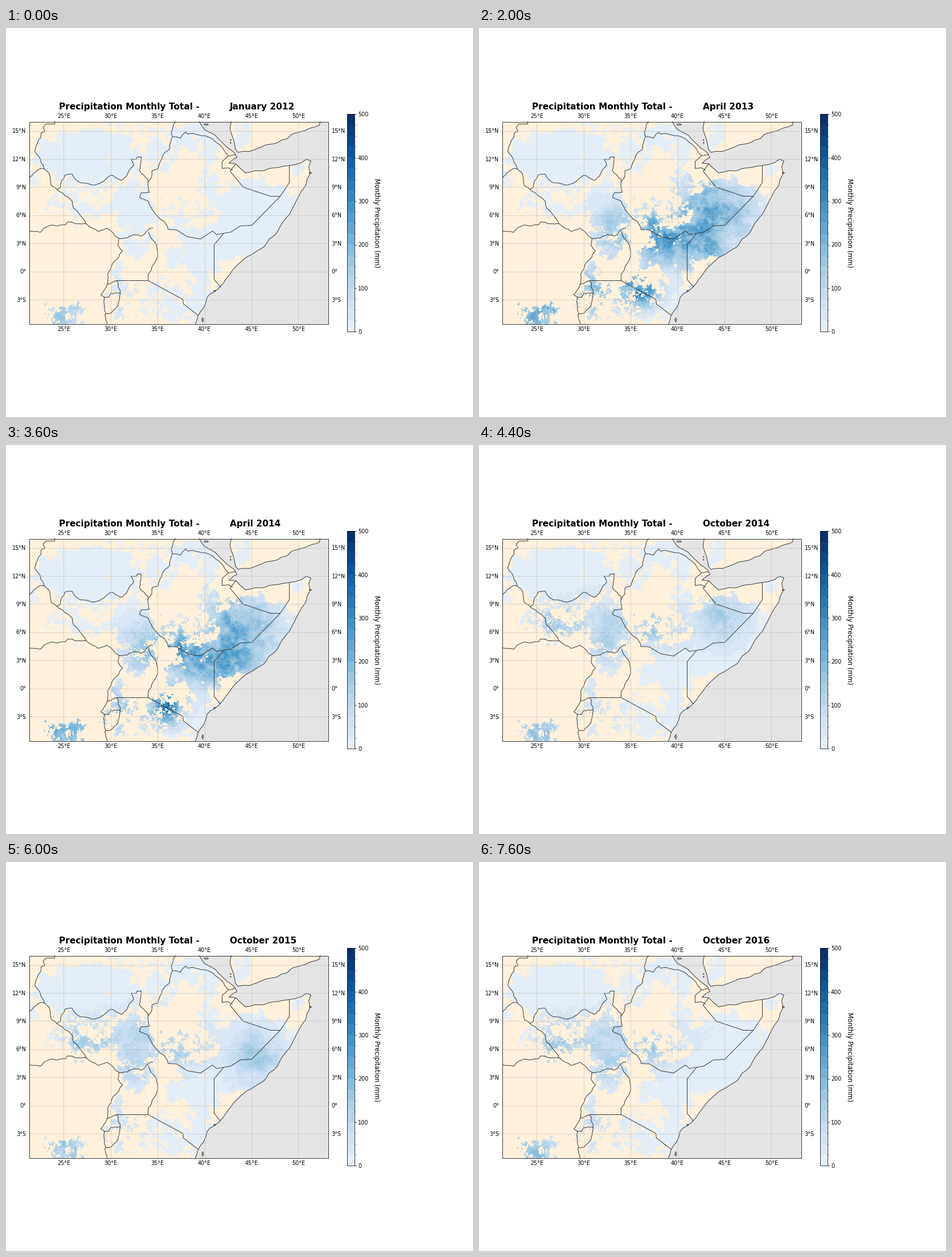
Recreate the animation shown at these times as a matplotlib script. Size 820 by 683 pixels, loop 8 s.

```python
import numpy as np
import matplotlib
import matplotlib.pyplot as plt
from matplotlib.animation import FuncAnimation
from matplotlib.colors import ListedColormap
from matplotlib.patches import Polygon, Rectangle

W, H, DPI = 820, 683, 64
PT = 68.333 / DPI
TEXT_PT = 69.2 / DPI
LEFT, RIGHT, TOP, BOTTOM = 41.3, 566, 164.8, 519.8
DEGREE, LON_25, EQUATOR = 16.48, 101.4, 427.8
COLS, ROWS = 318, 215
LAND, SEA, INK = "#fff1dc", "#e4e4e4", "#333333"
MONTHS = ("January", "April", "July", "October")

fig = plt.figure(figsize=(W / DPI, H / DPI), dpi=DPI, facecolor="white")
ax = fig.add_axes([0, 0, 1, 1])
ax.axis("off")
blues = ListedColormap(matplotlib.colormaps["Blues"](np.linspace(0.1, 1, 20)))
rng = np.random.default_rng(7)


def value_noise(gen, size):
    """Smoothly interpolated random lattice with cells of the given size."""
    grid = gen.random((int(ROWS / size) + 2, int(COLS / size) + 2))
    r, c = np.arange(ROWS) / size, np.arange(COLS) / size
    i, j = r.astype(int), c.astype(int)
    u, v = (r - i)[:, None], (c - j)[None, :]
    u, v = u * u * (3 - 2 * u), v * v * (3 - 2 * v)
    upper = grid[np.ix_(i, j)] * (1 - v) + grid[np.ix_(i, j + 1)] * v
    lower = grid[np.ix_(i + 1, j)] * (1 - v) + grid[np.ix_(i + 1, j + 1)] * v
    return upper * (1 - u) + lower * u


def fractal(gen, size, gain=0.8):
    """Layered noise, ranked so its values are spread evenly over 0..1."""
    total = sum(value_noise(gen, size / 2**k) * gain**k for k in range(4))
    return total.ravel().argsort().argsort().reshape(ROWS, COLS) / total.size


gx, gy = np.meshgrid(np.linspace(LEFT, RIGHT, COLS), np.linspace(TOP, BOTTOM, ROWS))
warp_x, warp_y = (18 * (fractal(rng, 16) - 0.5) for _ in "xy")


def region(x, y, rx, ry, density):
    """Chance of coverage inside a ragged ellipse, fading at its rim."""
    d = np.hypot((gx + warp_x - x) / rx, (gy + warp_y - y) / ry)
    return density * np.clip((1.12 - d) * 4, 0, 1)


WET = [
    (145, 226, 94, 48, 0.98), (55, 250, 25, 25, 0.6), (235, 195, 70, 45, 0.3),
    (225, 315, 40, 52, 0.97), (145, 308, 68, 34, 0.45), (230, 375, 36, 26, 0.7),
    (275, 232, 28, 26, 0.6), (318, 188, 34, 25, 0.95), (355, 240, 16, 60, 0.8),
    (315, 330, 48, 32, 0.35), (430, 340, 92, 72, 1), (335, 420, 46, 84, 0.97),
    (285, 475, 38, 36, 0.6), (201, 443, 10, 28, 0.8), (203, 496, 9, 18, 0.6),
    (101, 508, 15, 28, 0.9), (98, 505, 40, 24, 0.35), (412, 186, 15, 28, 0.9),
    (516, 241, 16, 12, 0.8), (215, 485, 50, 35, 0.12),
]
DRY = [
    (311, 440, 15, 28, 0.85), (286, 376, 22, 15, 0.8), (372, 447, 18, 20, 0.7),
    (404, 412, 20, 9, 0.5), (480, 264, 36, 18, 0.75), (360, 328, 20, 16, 0.5),
]
chance = np.max([region(*r) for r in WET], axis=0)
chance *= np.prod([1 - region(*r) for r in DRY], axis=0)
covered = fractal(rng, 8) < chance

# Rain cells as (x, y, radius, millimetres); autumn has a shifting eastern cell.
RAIN = {
    "January": [(102, 505, 60, 135), (203, 470, 40, 50)],
    "April": [(102, 505, 60, 185), (203, 460, 50, 140), (235, 350, 50, 120),
              (315, 365, 45, 220), (390, 385, 50, 190), (400, 305, 55, 160),
              (285, 460, 32, 280), (465, 330, 50, 80)],
    "July": [(60, 230, 55, 160), (160, 230, 75, 75), (235, 310, 60, 150),
             (140, 310, 55, 130), (295, 205, 45, 240), (238, 380, 28, 140),
             (350, 245, 40, 90)],
    "October": [(102, 505, 60, 140), (203, 460, 50, 65), (230, 310, 60, 85),
                (135, 318, 45, 120), (225, 365, 35, 60), (310, 325, 45, 100)],
}
AUTUMN = {2012: (430, 335, 55, 60), 2013: (445, 325, 50, 110), 2014: (425, 302, 50, 120),
          2015: (440, 340, 55, 125), 2016: (405, 300, 50, 20)}


def rainfall(frame):
    year, month = 2012 + frame // 4, MONTHS[frame % 4]
    gen = np.random.default_rng(100 + frame)
    cells = RAIN[month] + ([AUTUMN[year]] if month == "October" else [])
    total = sum(mm * np.exp(-((gx - x) ** 2 + (gy - y) ** 2) / r**2)
                for x, y, r, mm in cells)
    variation = 0.6 + 0.55 * fractal(gen, 16) + 0.25 * fractal(gen, 8)
    return np.ma.masked_where(~covered, 3 + total * variation)


def points(xy):
    return np.array(xy, float).reshape(-1, 2) + 0.5


def rough(xy, amount=0.06):
    """Break straight runs into small irregular bends."""
    pts = points(xy)
    for _ in range(3):
        step = np.diff(pts, axis=0)
        shift = rng.normal(0, amount, len(step)) * (np.hypot(*step.T) > 3)
        mids = (pts[:-1] + pts[1:]) / 2 + step[:, ::-1] * [-1, 1] * shift[:, None]
        pts = np.insert(pts, np.arange(1, len(pts)), mids, axis=0)
    return pts


def draw(pts):
    ax.plot(*pts.T, color=INK, lw=PT, zorder=3, solid_joinstyle="round")


def border(*xy):
    draw(rough(xy))


def straight(*xy):
    draw(points(xy))


def box(x0, y0, x1, y1, **style):
    ax.add_patch(Rectangle((x0, y0), x1 - x0, y1 - y0, **style))


raster = ax.imshow(rainfall(0), extent=(LEFT, RIGHT, BOTTOM, TOP), cmap=blues, vmin=0,
                   vmax=500, interpolation="nearest", aspect="auto", zorder=1)
box(LEFT, TOP, RIGHT, BOTTOM, fc=LAND, zorder=0)

africa = rough([339, 164, 347, 177, 367, 188, 378, 200, 401, 219, 405, 227, 391, 237,
                403, 238, 420, 254, 440, 250, 452, 250, 462, 246, 497, 241, 518, 236,
                527, 230, 535, 233, 531, 243, 533, 256, 526, 275, 512, 297, 497, 327,
                475, 359, 452, 384, 433, 396, 413, 409, 376, 453, 353, 472, 346, 492,
                337, 504, 332, 519], 0.03)
arabia = rough([395, 164, 393, 177, 400, 200, 402, 212, 407, 218, 428, 216, 455, 205,
                493, 194, 500, 187, 518, 181, 550, 170, 551, 164], 0.03)
corners = [(RIGHT, BOTTOM), (RIGHT, TOP)]
ax.add_patch(Polygon(np.vstack([africa, corners, arabia[::-1]]), fc=SEA, zorder=2))
draw(africa)
draw(arabia)

border(85, 164, 85, 168, 70, 168, 65, 173, 68, 181, 61, 184, 61, 191, 56, 198, 50, 215,
       59, 228, 61, 236, 67, 247, 76, 256, 79, 276, 89, 283, 116, 304, 118, 316,
       134, 333, 140, 343, 160, 356, 177, 351, 198, 369)
border(67, 247, 61, 246, 50, 253, 41, 262)
border(89, 283, 95, 279, 103, 258, 115, 256, 126, 269, 165, 272, 184, 258, 201, 267,
       211, 260, 224, 240, 219, 230)
straight(219, 230, 228, 230, 230, 226, 237, 226, 236, 238)
border(236, 238, 234, 250, 249, 265, 249, 270, 256, 250, 266, 247, 274, 225, 287, 210,
       292, 190, 290, 181, 297, 164)
border(249, 270, 251, 288, 237, 289, 234, 297, 250, 305, 266, 331, 277, 339, 284, 353)
straight(284, 353, 299, 354, 318, 366, 341, 370, 362, 356, 369, 362, 394, 358, 411, 347,
         431, 346, 481, 295, 464, 295, 416, 279, 393, 251, 403, 238)
border(292, 190, 306, 193, 315, 182, 319, 186, 350, 189, 365, 197, 390, 224, 402, 222)
straight(390, 224, 379, 234, 379, 246, 390, 245, 397, 249)
straight(497, 241, 497, 271, 481, 295)
straight(381, 361, 365, 380, 365, 441, 376, 454)
border(41, 356, 60, 358, 66, 351, 104, 345, 108, 340, 140, 343)
border(198, 369, 213, 368, 236, 365, 257, 351)
border(250, 358, 264, 381, 266, 400, 249, 432, 249, 443)
straight(193, 443, 249, 443, 310, 476, 311, 484, 337, 504)
border(198, 369, 196, 380, 204, 391, 188, 411, 178, 432, 177, 450, 166, 468, 172, 472,
       175, 501, 173, 503, 177, 519)
border(177, 450, 193, 443, 200, 465, 183, 466, 180, 472, 172, 472)
border(200, 465, 198, 479, 184, 500, 175, 501)
for x, y, rx, ry in [(345, 512, 1.5, 4), (366, 461, 2, 1), (534, 254, 2, 1),
                     (351, 169, 4, 1.5), (394, 196, 0.5, 1), (394, 201, 0.5, 1)]:
    straight(x - rx, y, x, y - ry, x + rx, y, x, y + ry, x - rx, y)


def label(x, y, text, size=10, **kw):
    kw = {"ha": "center", "va": "center_baseline", **kw}
    return ax.text(x, y, text, fontsize=size * TEXT_PT, family="DejaVu Sans", **kw)


grid_style = dict(color="#b0b0b0", lw=0.8 * PT, alpha=0.6, zorder=4)
frame_style = dict(fill=False, ec="black", lw=0.8 * PT, zorder=5)
for lon in range(25, 55, 5):
    x = LON_25 + (lon - 25) * DEGREE
    ax.plot([x, x], [TOP, BOTTOM], **grid_style)
    for y in (154, 528):
        label(x, y, f"{lon}°E")
for lat in range(-3, 18, 3):
    y = EQUATOR - lat * DEGREE
    ax.plot([LEFT, RIGHT], [y, y], **grid_style)
    name = f"{abs(lat)}°" + ("N" if lat > 0 else "S" if lat else "")
    label(35.5, y - 0.5, name, ha="right")
    label(571.5, y - 0.5, name, ha="left")
box(LEFT, TOP, RIGHT, BOTTOM, **frame_style)

# Colour scale
BAR_L, BAR_R, BAR_T, BAR_B = 599, 612, 151.3, 533.3
ax.imshow(np.arange(20)[::-1, None], extent=(BAR_L, BAR_R, BAR_B, BAR_T), cmap=blues,
          interpolation="nearest", aspect="auto")
box(BAR_L, BAR_T, BAR_R, BAR_B, **frame_style)
for mm in range(0, 501, 25):
    y = BAR_B - mm * (BAR_B - BAR_T) / 500
    major = mm % 100 == 0
    ax.plot([BAR_R, BAR_R + (3.3 if major else 1.9)], [y, y], color="black",
            lw=(0.8 if major else 0.6) * PT, solid_capstyle="butt")
    if major:
        label(618, y, str(mm), ha="left")
label(651, 342, "Monthly Precipitation (mm)", 12, rotation=270, va="center")

title_style = dict(size=16, weight="bold", ha="left", va="baseline")
label(92.8, 143, "Precipitation Monthly Total -", **title_style)
date = label(392.8, 143, "", **title_style)
ax.set(xlim=(0, W), ylim=(H, 0))


def update(frame):
    raster.set_data(rainfall(frame))
    date.set_text(f"{MONTHS[frame % 4]} {2012 + frame // 4}")
    return raster, date


anim = FuncAnimation(fig, update, frames=20, interval=400, repeat=True)
plt.show()
```
